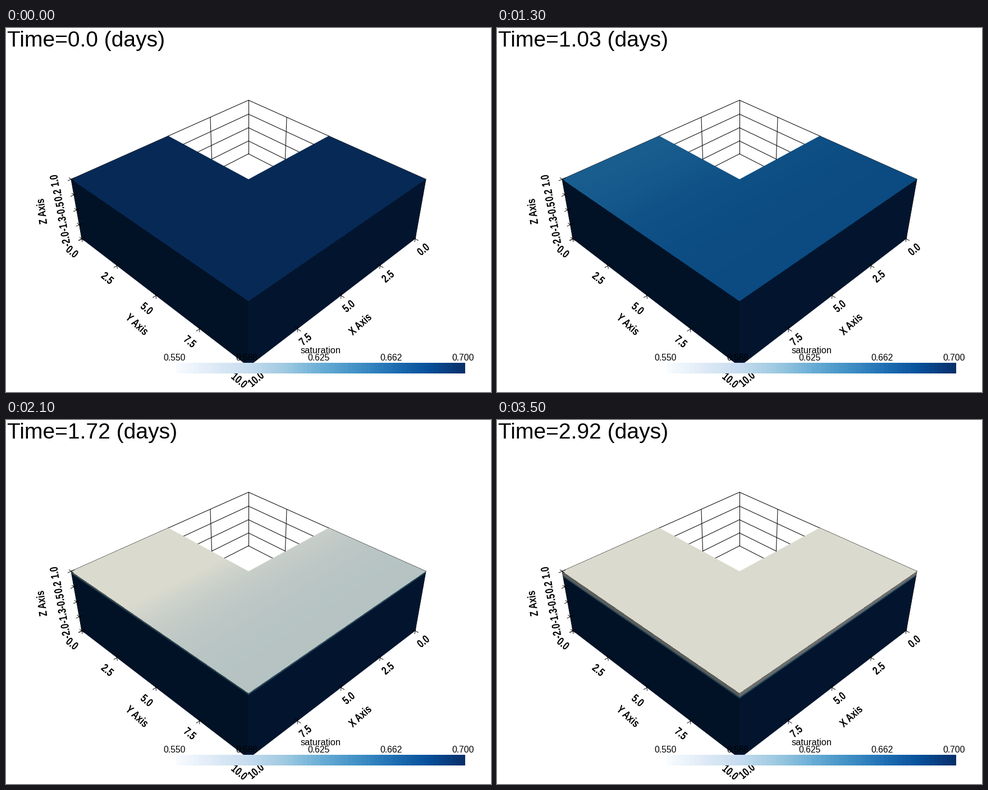
A matplotlib script that plays this animation: 864x648 px, repeating every 3700 ms.

```python
import numpy as np
import matplotlib.pyplot as plt
from matplotlib.animation import FuncAnimation
from matplotlib.patches import PathPatch, Polygon
from matplotlib.textpath import TextPath
from matplotlib.transforms import Affine2D

W, H, DPI = 864, 648, 100
PT = 72 / DPI
FONT = "Liberation Sans"
BLUES = plt.get_cmap("Blues")

# Isometric perspective camera around the centre of the block
CENTER = np.array([5, 5, -0.5])
NORMAL = np.array([1, 1, 1]) / np.sqrt(3)
RIGHT = np.array([-1, 1, 0]) / np.sqrt(2)
UP = np.array([-1, -1, 2]) / np.sqrt(6)
DIST = np.sqrt(209) / 2 / np.sin(np.radians(15))
FOCAL = H / 2 / np.tan(np.radians(15))


def project(*p):
    rel = np.array(p) - CENTER
    k = FOCAL / (DIST - rel @ NORMAL)
    return W / 2 + k * (rel @ RIGHT), H / 2 - k * (rel @ UP)


fig = plt.figure(figsize=(W / DPI, H / DPI), dpi=DPI, facecolor="white")
ax = fig.add_axes([0, 0, 1, 1])
ax.axis("off")


def segment(a, b, lw=1.0, z=1):
    (x0, y0), (x1, y1) = project(*a), project(*b)
    ax.plot([x0, x1], [y0, y1], color="black", lw=lw * PT, zorder=z)


def write(x, y, s, px, ha="center"):
    return ax.text(x, y, s, fontsize=px * PT, family=FONT, color="black",
                   ha=ha, va="baseline", zorder=6)


def axis_text(s, x, y, angle, size=15.5):
    path = TextPath((0, 0), s, size=size,
                    prop={"family": FONT, "weight": "bold"})
    box = path.get_extents()
    place = (Affine2D().translate(-(box.x0 + box.x1) / 2, -(box.y0 + box.y1) / 2)
             .scale(1, 1.3).rotate_deg(angle).scale(1, -1).translate(x, y))
    ax.add_patch(PathPatch(place.transform_path(path), fc="black", lw=0, zorder=4))


# Grid on the two back walls
steps = np.linspace(0, 10, 5)
levels = np.linspace(-2, 1, 5)
for z in levels:
    segment((0, 0, z), (10, 0, z))
    segment((0, 0, z), (0, 10, z))
for v in steps:
    segment((v, 0, -2), (v, 0, 1))
    segment((0, v, -2), (0, v, 1))


# Axis ticks
def tick(point, *dims):
    for d in dims:
        step = 0.15 * np.eye(3)[d]
        segment(point - step, point + step, 0.9, 3)


for v in steps:
    tick(np.array([10, v, -2]), 0, 2)
    tick(np.array([v, 10, -2]), 1, 2)
for z in levels:
    tick(np.array([10, 0, z]), 0, 1)

# Axis labels
y_spots = [(118, 398), (181, 445), (251, 499), (328, 558), (416, 627)]
x_spots = [(743, 394), (680, 442), (610, 495), (533, 554), (445, 625)]
for v, yp, xp in zip(steps, y_spots, x_spots):
    axis_text(f"{v:.1f}", *yp, -40)
    axis_text(f"{v:.1f}", *xp, 40)
z_spots = [(106, 376), (101, 349), (97, 323), (92, 298), (86, 272)]
for s, p in zip(("-2.0", "-1.3", "-0.5", "0.2", "1.0"), z_spots):
    axis_text(s, *p, 99)
axis_text("Y Axis", 234, 527, -42)
axis_text("X Axis", 630, 527, 42)
axis_text("Z Axis", 63, 327, 98)

# Cast one ray per pixel on to the visible faces of the block
px, py = np.meshgrid(np.arange(W) + 0.5, np.arange(H) + 0.5)
dx, dy = (px - W / 2) / FOCAL, (H / 2 - py) / FOCAL
rays = dx[..., None] * RIGHT + dy[..., None] * UP - NORMAL
eye = CENTER + DIST * NORMAL


def hit(dim, value):
    return eye + ((value - eye[dim]) / rays[..., dim])[..., None] * rays


top = hit(2, 1)
is_top = (top[..., 0] <= 10) & (top[..., 1] <= 10)
is_left = px < W / 2
side = np.where(is_left[..., None], hit(0, 10), hit(1, 10))
pos = np.where(is_top[..., None], top, side)
depth = np.where(is_top, 0, 1 - pos[..., 2])
light = np.where(is_top[..., None], (0.885, 0.87, 0.81),
                 np.where(is_left[..., None], (0.37, 0.375, 0.36),
                          (0.44, 0.44, 0.43)))

START, BASE, FRONT = 0.87, 0.93, 0.135
rate = BASE + 0.49 * np.exp(-(np.clip(pos[..., 1], 0, 10) / 4.3) ** 2)


def shade(t):
    """Lit colours of the drying front, which sinks once the surface is dry."""
    surface = 1 - rate * max(t - START, 0)
    surface = np.where(surface < 0, surface * BASE / rate, surface)
    sat = np.clip(surface + depth / FRONT, 0, 1)
    return BLUES(sat)[..., :3] * light


outline = [(10, 0, 1), (5, 0, 1), (5, 5, 1), (0, 5, 1), (0, 10, 1),
           (0, 10, -2), (10, 10, -2), (10, 0, -2)]
body = ax.imshow(shade(0), extent=(0, W, H, 0), interpolation="nearest",
                 aspect="auto", zorder=2)
body.set_clip_path(Polygon([project(*p) for p in outline],
                           transform=ax.transData))

# Colour bar
ax.imshow(BLUES(np.linspace(0, 1, 64))[None, :, :3], extent=(303, 817.5, 615, 596),
          interpolation="nearest", aspect="auto", zorder=5)
for i, s in enumerate(("0.550", "0.588", "0.625", "0.662", "0.700")):
    write(300 + 128.6 * i, 591.5, s, 15.7)
write(561, 579, "saturation", 16.4)

clock = write(2.2, 33, "", 39, "left")
ax.set_xlim(0, W)
ax.set_ylim(H, 0)


def update(i):
    t = 0.086 * min(max(i - 1, 0), 34)
    clock.set_text(f"Time={round(t, 2)} (days)")
    body.set_data(shade(t))
    return body, clock


anim = FuncAnimation(fig, update, frames=37, interval=100, repeat=True,
                     repeat_delay=0, blit=False)
plt.show()
```
